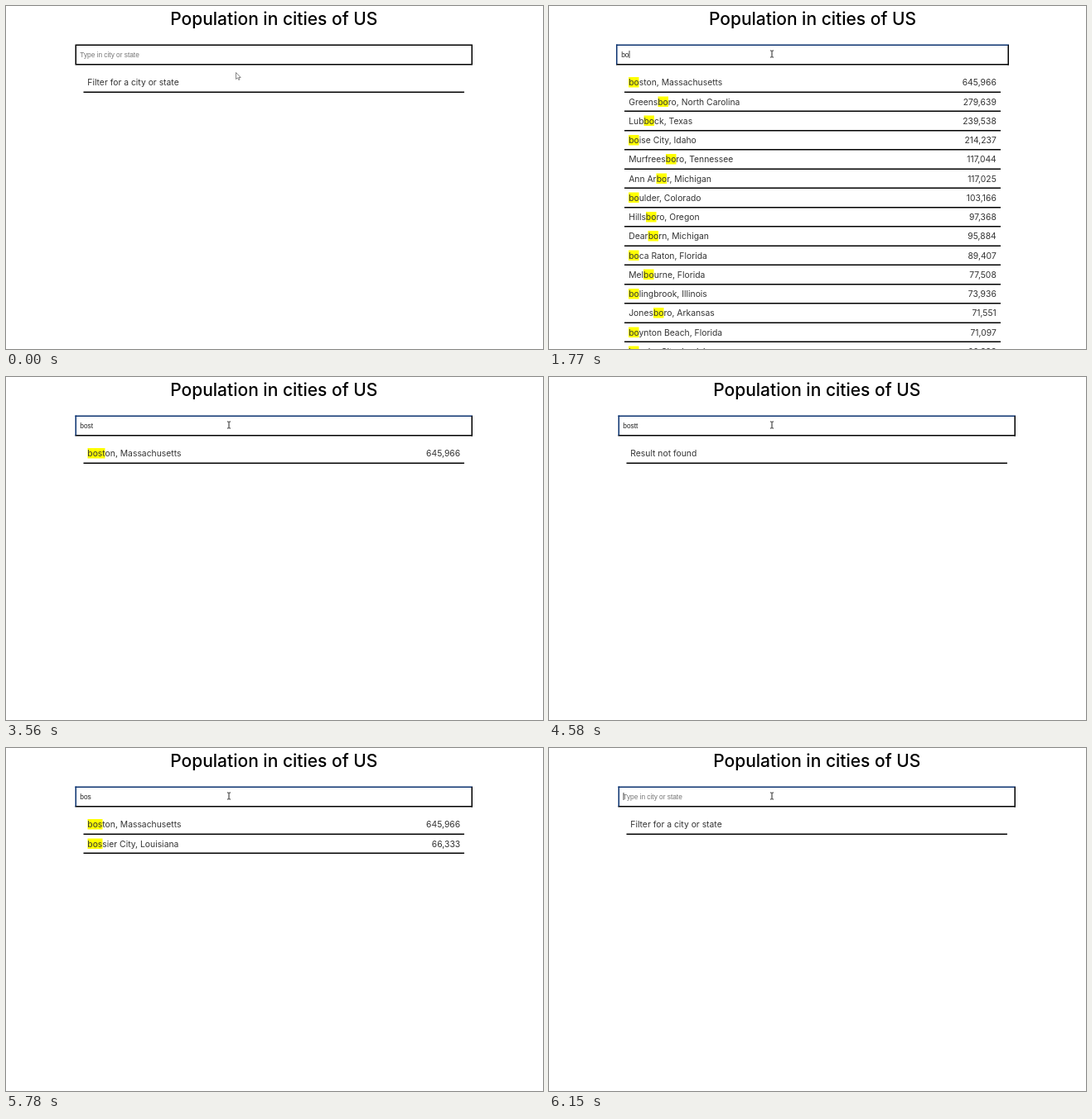
Recreate the animation shown at these times as an HTML page. Size 648 px wide and 415 px high, loop 6.32 s.

```html
<!DOCTYPE html>
<html lang="en">
<head>
<meta charset="utf-8">
<title>Population in cities of US</title>
<style>
  html, body { margin: 0; width: 648px; height: 415px; overflow: hidden; background: #fff; }
  /* Laid out at double size, so that edges can fall on half pixels. */
  #page { position: absolute; left: 0; top: 0; width: 1293px; height: 830px; overflow: hidden;
    transform: scale(.5); transform-origin: 0 0; font-family: Inter, sans-serif; }
  #page.scrolled { width: 1272px; }
  h1 { margin: 0; height: 93px; font: 500 42px/60px Inter, sans-serif; text-align: center; }
  #field { box-sizing: border-box; width: calc(60% + 184px); height: 50px; margin: 0 auto 20px; padding-left: 9px;
    border: 3px solid #000; font: 16.6px/44px "Liberation Sans", Arial, sans-serif; color: #222; white-space: pre; }
  #field.focused { border-top-color: #0b3270; border-left-color: #0b3270; }
  .hint { color: #757575; }
  .caret { display: inline-block; width: 2px; height: 18px; margin-right: -2px; background: #444; vertical-align: -3px; }
  ul { width: calc(60% + 144px); margin: 0 auto; padding: 0; list-style: none; }
  li { box-sizing: border-box; display: flex; justify-content: space-between; height: 46.54px; padding: 0 10px;
    border-bottom: 3px solid #000; font-size: 20.7px; line-height: 43.5px; color: #333; white-space: pre; }
  mark { background: #ff0; color: inherit; }
  svg { position: absolute; left: 0; top: 0; overflow: visible; }
</style>
</head>
<body>
<div id="page">
  <h1>Population in cities of US</h1>
  <div id="field"></div>
  <ul id="list"></ul>
</div>
<svg width="1" height="1">
  <path id="arrow" d="M0 0V8L2 6.3L3.3 9L4.5 8.4L3.3 6H5.7Z" fill="#fff" stroke="#555" stroke-width=".7"/>
  <path id="beam" d="M-2 -4H-.5L0 -3.5L.5 -4H2M0 -3.5V3.5M-2 4H-.5L0 3.5L.5 4H2" fill="none" stroke="#222"/>
</svg>
<script>
const LOOP = 6320;
const $ = id => document.getElementById(id);

const cities = `Boston, Massachusetts|645,966
Greensboro, North Carolina|279,639
Lubbock, Texas|239,538
Boise City, Idaho|214,237
Murfreesboro, Tennessee|117,044
Ann Arbor, Michigan|117,025
Boulder, Colorado|103,166
Hillsboro, Oregon|97,368
Dearborn, Michigan|95,884
Boca Raton, Florida|89,407
Melbourne, Florida|77,508
Bolingbrook, Illinois|73,936
Jonesboro, Arkansas|71,551
Boynton Beach, Florida|71,097
Bossier City, Louisiana|66,333`.split("\n").map(line => line.split("|"));

// [start, typed text, searched text]
const typing = [
  [0, "", ""], [1770, "bo", "bo"], [2280, "bos", "bos"], [3000, "bost", "bost"], [4040, "bostt", "bostt"],
  [5130, "bost", "bostt"], [5310, "bost", "bost"], [5650, "bos", "bos"], [5910, "bo", "bo"], [6070, "", ""]
];
// [start, visible]
const blinks = [
  [0, false], [410, true], [1150, false], [1770, true], [2840, false], [3000, true], [3560, false],
  [4040, true], [4580, false], [5060, true], [5780, false], [5910, true]
];
// [start, shape, x, y]
const pointer = [
  [0, "arrow", 277.5, 80.5], [90, "beam", 274, 66], [180, "beam", 272, 57], [720, "beam", 269, 58]
];

const at = (track, t) => track.findLast(step => step[0] <= t);
const row = (name, value = "") => `<li><span>${name}</span><span>${value}</span></li>`;

function results(query) {
  if (!query) return row("Filter for a city or state");
  const pattern = new RegExp(query, "gi");
  const found = cities.filter(([name]) => name.search(pattern) >= 0);
  if (!found.length) return row("Result not found");
  return found.map(([name, count]) => row(name.replace(pattern, `<mark>${query}</mark>`), count)).join("");
}

let shown = "";
function draw(now) {
  const t = now % LOOP;
  const [, typed, query] = at(typing, t);
  const [, caret] = at(blinks, t);
  const [, shape, x, y] = at(pointer, t);

  const state = [typed, query, caret].join();
  if (state !== shown) {
    shown = state;
    const bar = caret ? '<span class="caret"></span>' : "";
    $("field").innerHTML = typed ? typed + bar : bar + '<span class="hint">Type in city or state</span>';
    $("list").innerHTML = results(query);
    $("page").className = query === "bo" ? "scrolled" : "";
  }
  $("field").className = t >= 410 ? "focused" : "";
  for (const id of ["arrow", "beam"]) {
    $(id).style.display = id === shape ? "" : "none";
    $(id).setAttribute("transform", `translate(${x} ${y})`);
  }
  requestAnimationFrame(() => draw(performance.now()));
}
draw(0);
</script>
</body>
</html>
```
